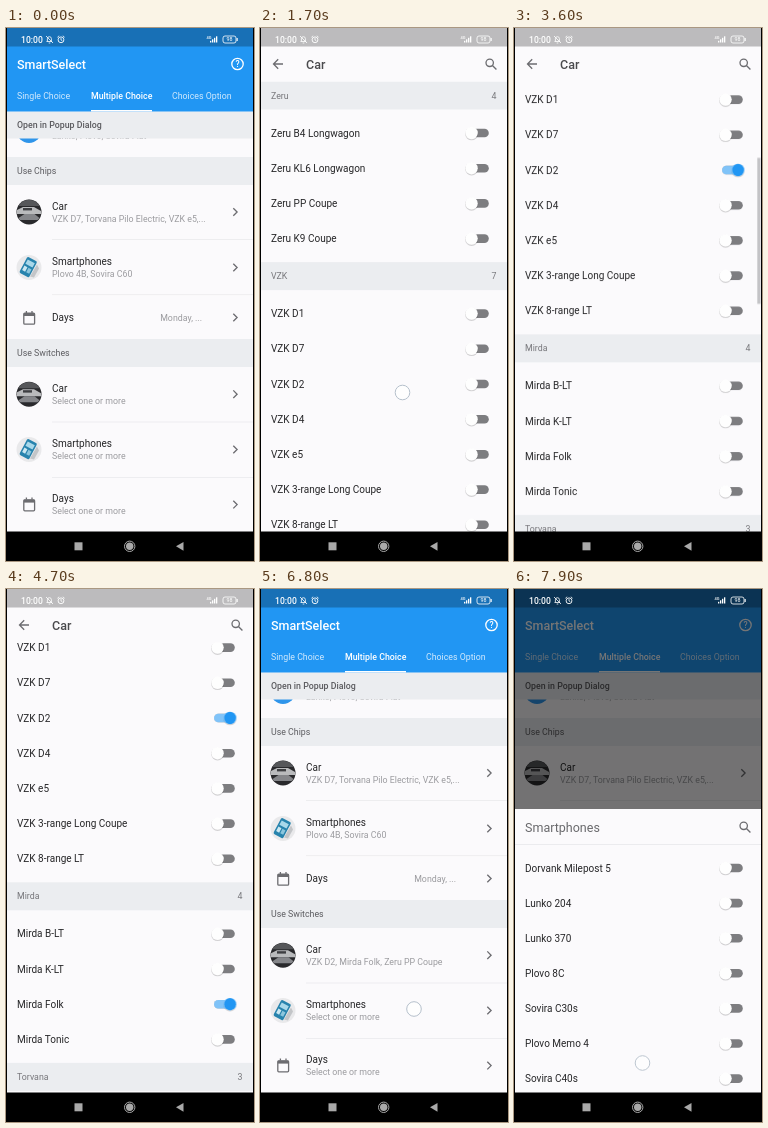
An HTML page for the animation above (8000 ms loop, 248 by 533 pixels).

```html
<!DOCTYPE html>
<html lang="en">
<head>
<meta charset="utf-8">
<title>SmartSelect</title>
<style>
html, body { margin: 0; width: 100%; height: 100%; overflow: hidden; background: #000; }
svg { display: block; width: 248px; height: 533px; font-family: Roboto, Arial, sans-serif; }
.line { fill: none; stroke-width: 1.3; }

/* Whole-loop motion: 1% is 80 ms */
.fade { animation: fade 8s infinite; }
.rise { animation: rise 8s infinite; }
.list { animation: scroll 8s linear infinite; }
.bar { animation: bar 8s linear infinite, barfade 8s linear infinite; }
.sheet { animation: sheet 8s linear infinite; }
.scrim { animation: scrim 8s linear infinite; }
.drag { opacity: 0; animation: drag 8s linear infinite; }
.before { animation: hide 8s step-end infinite; }
.after { animation: show 8s step-end infinite; }

/* Short pulses, placed by --at */
.tap, .ripple { opacity: 0; animation: tap 8s linear var(--at) infinite; }
.ripple { animation-name: ripple; }
.on .thumb { animation: slide 8s ease-in-out var(--at) infinite; }
.on .blue { animation: show-on 8s linear var(--at) infinite; }
.blue { opacity: 0; }

@keyframes fade {
  0% { opacity: 0; }
  13.75% { opacity: 0; animation-timing-function: ease-in; }
  17.5% { opacity: 1; }
  70% { opacity: 1; animation-timing-function: ease-out; }
  73.75%, 100% { opacity: 0; }
}
@keyframes rise {
  0% { transform: translateY(128px); }
  13.75% { transform: translateY(128px); animation-timing-function: cubic-bezier(.4, 0, .2, 1); }
  17.5% { transform: none; }
  70% { transform: none; animation-timing-function: cubic-bezier(.8, 0, .6, 1); }
  73.75%, 100% { transform: translateY(128px); }
}
@keyframes scroll {
  0%, 38.125% { transform: none; }
  40% { transform: translateY(-88.5px); animation-timing-function: cubic-bezier(.2, .6, .4, 1); }
  48.75%, 100% { transform: translateY(-227px); }
}
@keyframes bar {
  0%, 38.125% { transform: none; }
  40% { transform: translateY(31.6px); animation-timing-function: cubic-bezier(.2, .6, .4, 1); }
  48.75%, 100% { transform: translateY(81px); }
}
@keyframes barfade {
  0%, 38.125% { opacity: 0; }
  39%, 55.6% { opacity: 1; }
  58.7%, 100% { opacity: 0; }
}
@keyframes sheet {
  0% { transform: translateY(284px); }
  88.1% { transform: translateY(284px); animation-timing-function: cubic-bezier(0, 0, .2, 1); }
  92%, 100% { transform: none; }
}
@keyframes scrim {
  0%, 88.1% { opacity: 0; }
  92%, 100% { opacity: 1; }
}
@keyframes drag {
  0%, 38.1% { opacity: 0; transform: translateY(89px); }
  38.3% { opacity: 1; transform: translateY(80px); }
  40% { opacity: 1; transform: none; }
  41%, 100% { opacity: 0; transform: translateY(-40px); }
}
@keyframes tap {
  0% { opacity: 0; }
  .2%, 2.5% { opacity: 1; }
  3.75%, 100% { opacity: 0; }
}
@keyframes ripple {
  0% { opacity: 0; }
  1.5%, 3% { opacity: 1; }
  5%, 100% { opacity: 0; }
}
@keyframes slide {
  0% { transform: none; }
  2.2%, 52.5% { transform: translateX(12.4px); }
  52.6%, 100% { transform: none; }
}
@keyframes show-on {
  0% { opacity: 0; }
  2.2%, 52.5% { opacity: 1; }
  52.6%, 100% { opacity: 0; }
}
@keyframes hide { 0% { opacity: 1; } 69.4%, 100% { opacity: 0; } }
@keyframes show { 0% { opacity: 0; } 69.4%, 100% { opacity: 1; } }
</style>
</head>
<body>
<svg id="stage" viewBox="0 0 248 533"></svg>
<script>
const BLUE = '#2196f3', PAPER = '#fbfafc', BAND = '#ebedf0';
const INK = '#262628', SOFT = '#9b9b9f', ICON = '#6c6c70';

const rect = (x, y, w, h, fill, more = '') =>
  `<rect x="${x}" y="${y}" width="${w}" height="${h}" fill="${fill}" ${more}/>`;
const disc = (x, y, r, fill, more = '') =>
  `<circle cx="${x}" cy="${y}" r="${r}" fill="${fill}" ${more}/>`;
const line = (d, color, more = '') => `<path class="line" d="${d}" stroke="${color}" ${more}/>`;
// Text is placed by its vertical centre
const text = (x, cy, str, size, fill, more = '') =>
  `<text x="${x}" y="${cy + size * .36}" font-size="${size}" fill="${fill}" ${more}>${str}</text>`;
const group = (cls, body, more = '') => `<g class="${cls}" ${more}>${body}</g>`;
const at = ms => `style="--at:${ms}ms"`;
const END = 'text-anchor="end"', MID = 'text-anchor="middle"', MEDIUM = 'font-weight="500"';

const band = (y, h, label, more = '') =>
  rect(1, y, 246, h, BAND) + text(11, y + h / 2, label, 8.8, '#5b5b5f', more);
const chevron = y => line(`M227.3 ${y - 3.8}l3.8 3.8-3.8 3.8`, ICON);
const search = y => disc(229.7, y - 1.2, 3.7, 'none', `class="line" stroke="${ICON}"`) +
  line(`M232.4 ${y + 1.5}l4 4`, ICON, 'stroke-width="1.6"');

const photos = {
  car: y => group('', disc(23, y, 12.5, '#29292c') +
    `<path d="M12.2 ${y - 6}a12.5 12.5 0 0 1 21.6 0z" fill="#56575a"/>` +
    `<path d="M11 ${y - 2}l6-3h11l7 4v3H11z" fill="#b9babc"/>` +
    rect(17, y - 4, 9, 2.4, '#3d3e41') +
    `<path d="M12.5 ${y + 6}l6-4h10l5 4-2 2H14z" fill="#85868a"/>`),
  phone: y => disc(23, y, 12.5, '#e9e9eb') +
    group('', rect(-5.5, -9.5, 11, 18, '#2783ad', 'rx="1.5"') +
      rect(-4, -7, 8, 5, '#a9d8ea') + rect(-4, 0, 3.4, 5, '#cbe7f1') + rect(.6, 0, 3.4, 5, '#8cc6dd'),
      `transform="translate(22 ${y}) rotate(28)"`) +
    `<path d="M24 ${y + 9}l7-12 2 4-5 9z" fill="#c3c5c8"/>`,
  days: y => rect(17.8, y - 4.8, 10.8, 11, 'none', `rx="1" class="line" stroke="${ICON}"`) +
    rect(17.8, y - 5, 10.8, 3, ICON) + line(`M20.4 ${y - 7}v2M26 ${y - 7}v2`, ICON)
};

// Two-line row on the home page
const row = (y, photo, title, sub) => photos[photo](y) +
  text(46, y - 6, title, 10, INK) + (sub[0] === '<' ? sub : text(46, y + 6.7, sub, 8.8, SOFT)) + chevron(y);
const divider = y => rect(46, y, 201, .6, '#e5e5e8');

const toggle = (y, ms) => group(ms ? 'on' : '',
  rect(208, y - 4.3, 20.8, 8.6, '#7d7d80', 'rx="4.3"') +
  group('blue', rect(208, y - 4.3, 20.8, 8.6, PAPER, 'rx="4.3"') + rect(208, y - 4.3, 20.8, 8.6, '#80c3f8', 'rx="4.3"')) +
  group('thumb', disc(211.6, y + .8, 6.5, '#000', 'opacity=".16"') + disc(211.6, y, 6.2, '#fefefe') +
    disc(211.6, y, 6.2, BLUE, 'class="blue"')), ms ? at(ms) : '');
const option = (y, label, ms) => text(11, y, label, 10, INK) + toggle(y, ms);

const pick = 'Select one or more';
const carSub = text(46, 372.9, pick, 8.8, SOFT, 'class="before"') +
  text(46, 372.9, 'VZK D2, Mirda Folk, Zeru PP Coupe', 8.8, SOFT, 'class="after"');

const home = rect(1, 0, 246, 504, PAPER) +
  disc(23, 102.5, 12.5, '#2f95ea') + text(46, 108.3, 'Lunko, Plovo, Sovira Flat', 8.8, SOFT) +
  band(83.5, 27, 'Open in Popup Dialog', MEDIUM) +
  band(129, 28, 'Use Chips') +
  row(184, 'car', 'Car', 'VZK D7, Torvana Pilo Electric, VZK e5,...') + divider(211) +
  row(239.5, 'phone', 'Smartphones', 'Plovo 4B, Sovira C60') + divider(266.5) +
  photos.days(290) + text(46, 289.5, 'Days', 10, INK) + text(196, 289.5, 'Monday, ...', 8.8, SOFT, END) + chevron(289.5) +
  band(311, 28, 'Use Switches') +
  rect(1, 339, 246, 55, 'rgba(0,0,0,.06)', `class="ripple" ${at(920)}`) +
  rect(1, 394, 246, 55, 'rgba(0,0,0,.06)', `class="ripple" ${at(6810)}`) +
  row(366.2, 'car', 'Car', carSub) + divider(393.7) +
  row(421.5, 'phone', 'Smartphones', pick) + divider(449) +
  row(476.6, 'days', 'Days', pick) +
  rect(1, 0, 246, 83.5, BLUE) +
  text(11, 36, 'SmartSelect', 12.5, '#fff', MEDIUM) +
  disc(231.5, 36, 5.7, 'none', 'class="line" stroke="#fff"') + text(231.5, 36, '?', 8.5, '#fff', `${MID} ${MEDIUM}`) +
  text(11, 68, 'Single Choice', 8.8, '#d3eafd') +
  text(85, 68, 'Multiple Choice', 8.8, '#fff', MEDIUM) +
  text(166, 68, 'Choices Option', 8.8, '#d3eafd') +
  rect(85, 82, 61, 1.5, '#fff');

const sections = [
  ['Zeru', 4, ['Zeru B4 Longwagon', 'Zeru KL6 Longwagon', ['Zeru PP Coupe', 2430], 'Zeru K9 Coupe']],
  ['VZK', 7, ['VZK D1', 'VZK D7', ['VZK D2', 1790], 'VZK D4', 'VZK e5', 'VZK 3-range Long Coupe', 'VZK 8-range LT']],
  ['Mirda', 4, ['Mirda B-LT', 'Mirda K-LT', ['Mirda Folk', 4050], 'Mirda Tonic']],
  ['Torvana', 3, []]
];
let top_ = 53.5, cars = '';
for (const [name, count, items] of sections) {
  cars += band(top_, 28, name).replace('#5b5b5f', '#77777b') + text(236.5, top_ + 14, count, 8.8, '#77777b', END);
  items.forEach((item, i) => {
    const [label, ms] = [].concat(item);
    cars += option(top_ + 51.5 + i * 35.2, label, ms);
  });
  top_ += 39.8 + items.length * 35.2;
}

const carPage = rect(1, 0, 246, 504, PAPER) +
  group('', group('list', cars), 'clip-path="url(#body)"') +
  rect(243.3, 53.5, 3.2, 146, '#c3c3c6', 'class="bar"') +
  rect(1, 0, 246, 53.5, PAPER) +
  line('M23 36H13.6M18.2 31.3L13.5 36l4.7 4.7', ICON) +
  text(46, 36, 'Car', 12.5, '#4a4a4d', MEDIUM) + search(36);

const phones = ['Dorvank Milepost 5', 'Lunko 204', 'Lunko 370', 'Plovo 8C', 'Sovira C30s', 'Plovo Memo 4', 'Sovira C40s'];
const sheet = rect(1, 220, 246, 284, PAPER) + rect(1, 255, 246, .7, '#e6e6e9') +
  text(11, 238, 'Smartphones', 12.5, '#69696c') + search(238) +
  phones.map((p, i) => option(279 + i * 35.1, p)).join('');

const status = rect(1, 0, 246, 18.5, 'rgba(0,0,0,.25)') +
  text(15, 11.5, '10:00', 8.6, '#fff', MEDIUM) +
  line('M40.5 13.5h5.6M41.4 13.3v-2.6a2 2 0 0 1 4 0v2.6M42.7 15h1.6M40 8l7 7', '#fff', 'style="stroke-width:.8"') +
  disc(55, 11.8, 2.9, 'none', 'stroke="#fff" stroke-width=".9"') +
  line('M55 10v2l1.3.7M51.4 9.3l1.8-1.5M58.6 9.3l-1.8-1.5', '#fff', 'style="stroke-width:.8"') +
  text(200.5, 9.5, '4G', 4, '#fff', MEDIUM) +
  [0, 1, 2, 3].map(i => rect(204 + i * 2, 12.8 - i * 1.5, 1.3, 1.7 + i * 1.5, '#fff')).join('') +
  rect(217, 8, 13, 7, 'none', 'rx="2" stroke="#fff" stroke-width=".8"') + rect(230.6, 10, 1.1, 3, '#fff') +
  text(223.5, 11.5, '98', 5.4, '#fff', MID);

const nav = rect(0, 503.5, 248, 29.5, '#000') +
  rect(68.5, 514.3, 8, 8, '#a9a9a9') +
  disc(123.7, 518.3, 5.2, 'none', 'stroke="#a9a9a9" stroke-width="1"') + disc(123.7, 518.3, 3.7, '#a9a9a9') +
  '<path d="M170 518.3l7.5-4.4v8.8z" fill="#a9a9a9"/>';

const finger = (x, y, more) =>
  disc(x, y, 7.3, 'rgba(255,255,255,.75)', `stroke="#b4bfca" stroke-width="1" ${more}`);
const taps = [
  [150, 366, 880], [142.5, 364.5, 1650], [142.5, 180, 2370], [146, 415.5, 3970],
  [26, 42, 5480], [154, 420, 6760], [128.5, 474, 7690]
];

document.getElementById('stage').innerHTML =
  '<clipPath id="body"><rect x="1" y="53.5" width="246" height="450"/></clipPath>' +
  rect(0, 0, 248, 533, '#000') + home +
  rect(1, 0, 246, 504, 'rgba(0,0,0,.54)', 'class="scrim"') + group('sheet', sheet) +
  group('fade', group('rise', carPage)) +
  status + nav +
  taps.map(([x, y, ms]) => finger(x, y, `class="tap" ${at(ms)}`)).join('') +
  finger(150.5, 362, 'class="drag"');
</script>
</body>
</html>
```
